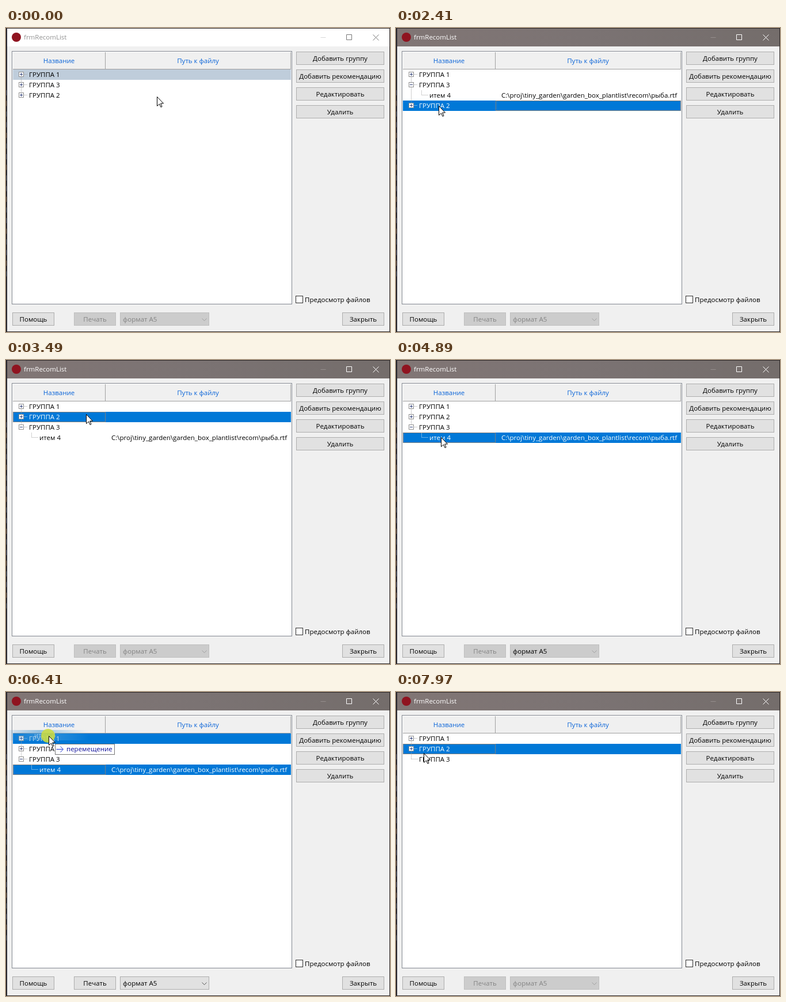
Write an HTML page with a canvas that moves like this. It is 667 px wide and 528 px high and loops after 8 s.

```html
<!DOCTYPE html>
<html lang="ru">
<head>
<meta charset="utf-8">
<title>frmRecomList</title>
<style>
  html, body { margin: 0; width: 100%; height: 100%; overflow: hidden; background: #f0f0f0; }
  canvas { display: block; width: 667px; height: 528px; }
</style>
</head>
<body>
<canvas id="stage" width="667" height="528"></canvas>
<script>
const ctx = document.getElementById('stage').getContext('2d');
const LOOP = 8000, TICK = 40, ROW_TOP = 72, ROW_H = 18;
const BLUE = '#0078d7', PATH = 'C:\\proj\\tiny_garden\\garden_box_plantlist\\recom\\рыба.rtf';

// Pointer positions: time, x, y
const POINTER = [
  [0, 262, 119], [410, 262, 119], [1050, 22, 98], [1330, 22, 98], [1970, 74, 137],
  [2370, 74, 137], [2410, 74, 135], [2530, 74, 135], [3050, 139, 95], [3410, 139, 95],
  [3490, 139, 94], [3890, 139, 94], [4410, 64, 133], [4690, 64, 133], [4890, 78, 134],
  [4970, 78, 134], [5330, 83, 136], [5690, 83, 136], [6130, 74, 76], [6970, 74, 76],
  [7130, 60, 102], [7210, 60, 102], [7770, 629, 495], [7810, 588, 494], [7970, 48, 106]
];

// Drag operations: image edge and label offsets are relative to the pointer
const DRAGS = [
  { from: 2530, to: 3410, label: 'ГРУППА 2', edge: -62, text: -34 },
  { from: 5690, to: 6690, label: 'итем 4', edge: -72, text: -25 }
];

const clamp = v => Math.max(0, Math.min(1, v));

function pointerAt(t) {
  const next = POINTER.findIndex(p => p[0] > t);
  if (next < 0) return POINTER[POINTER.length - 1].slice(1);
  if (next === 0) return POINTER[0].slice(1);
  const [t0, x0, y0] = POINTER[next - 1], [t1, x1, y1] = POINTER[next];
  const k = (t - t0) / (t1 - t0), e = k * k * (3 - 2 * k);
  return [Math.round(x0 + (x1 - x0) * e), Math.round(y0 + (y1 - y0) * e)];
}

function rect(x, y, w, h, fill, border) {
  ctx.fillStyle = border || fill;
  ctx.fillRect(x, y, w, h);
  if (border) {
    ctx.fillStyle = fill;
    ctx.fillRect(x + 1, y + 1, w - 2, h - 2);
  }
}

function text(label, x, baseline, color = '#000', align = 'left') {
  ctx.font = '11.5px "Open Sans", "Noto Sans", sans-serif';
  ctx.fillStyle = color;
  ctx.textAlign = align;
  ctx.fillText(label, x, baseline);
}

function lines(color, dash, ...paths) {
  ctx.strokeStyle = color;
  ctx.lineWidth = 1;
  ctx.setLineDash(dash);
  ctx.beginPath();
  for (const [first, ...rest] of paths) {
    ctx.moveTo(first[0] + .5, first[1] + .5);
    rest.forEach(p => ctx.lineTo(p[0] + .5, p[1] + .5));
  }
  ctx.stroke();
  ctx.setLineDash([]);
}

function button(label, x, y, w, enabled = true) {
  rect(x, y, w, 23, enabled ? '#e1e1e1' : '#cccccc', enabled ? '#adadad' : '#bfbfbf');
  text(label, x + w / 2, y + 16, enabled ? '#000' : '#838383', 'center');
}

function drawWindow(active) {
  rect(0, 0, 667, 528, '#f0f0f0', '#2b2626');
  rect(0, 0, 2, 528, '#25232a');
  for (let i = 0; i < 18; i++) {
    rect(0, 108 + i * 18.5, 1, 9, ['#555a70', '#765b45', '#4c5968'][i % 3]);
  }
  if (active) {
    const shade = ctx.createLinearGradient(0, 0, 667, 0);
    shade.addColorStop(0, '#817675');
    shade.addColorStop(.5, '#7b7373');
    shade.addColorStop(1, '#746d6b');
    rect(2, 1, 664, 31, shade);
  } else {
    rect(2, 1, 664, 31, '#fff');
  }
  ctx.fillStyle = '#8f1420';
  ctx.beginPath();
  ctx.arc(18, 16, 8, 0, 7);
  ctx.fill();
  text('frmRecomList', 31, 20, active ? '#fff' : '#929292');
  const ink = active ? '#fff' : '#777';
  lines(active ? '#958e8d' : '#d8d8d8', [], [[546, 16], [555, 16]]);
  lines(ink, [], [[591, 11], [600, 11], [600, 20], [591, 20], [591, 11]],
    [[637, 11], [647, 21]], [[647, 11], [637, 21]]);
}

function drawPrintControls(t) {
  const on = t >= 4890 && t < 7130;
  const level = clamp((t - 4890) / 320) * (1 - clamp((t - 7130) / 320));
  const panel = enabled => {
    button('Печать', 118, 494, 73, enabled);
    rect(198, 494, 155, 23, enabled ? '#e1e1e1' : '#cccccc', enabled ? '#adadad' : '#bfbfbf');
    lines(enabled ? '#555' : '#a0a0a0', [], [[340, 504], [344, 508], [348, 504]]);
  };
  panel(false);
  ctx.globalAlpha = level;
  panel(true);
  ctx.globalAlpha = 1;
  text('формат A5', 203, 510, on ? '#000' : '#838383');
}

function drawControls(t) {
  ['Добавить группу', 'Добавить рекомендацию', 'Редактировать', 'Удалить']
    .forEach((label, i) => button(label, 504, 41 + i * 31, 153));
  rect(503, 465, 13, 13, '#fff', '#333');
  text('Предосмотр файлов', 519, 476);
  button('Помощь', 11, 494, 73);
  button('Закрыть', 584, 494, 73);
  drawPrintControls(t);
}

function rowsAt(t) {
  const group = (n, sign) => ({ label: 'ГРУППА ' + n, sign });
  const item = { label: 'итем 4', path: PATH };
  if (t < 1250) return [group(1, '+'), group(3, '+'), group(2, '+')];
  if (t < 3410) return [group(1, '+'), group(3, '-'), item, group(2, '+')];
  if (t < 6690) return [group(1, '+'), group(2, '+'), group(3, '-'), item];
  return [group(1, '+'), group(2, '+'), group(3, '')];
}

function selectedAt(t) {
  if (t < 330) return 'ГРУППА 1';
  if (t < 4890) return 'ГРУППА 2';
  if (t < 6690) return 'итем 4';
  return t < 7130 ? '' : 'ГРУППА 2';
}

function drawFocus(x, y, w) {
  lines('#ff8728', [1, 1],
    [[x, y], [x + w - 1, y], [x + w - 1, y + ROW_H - 1], [x, y + ROW_H - 1], [x, y]]);
}

function drawTree(t, drag, pointerY) {
  rect(10, 40, 487, 440, '#fff', '#828790');
  rect(12, 42, 483, 29, '#f0f0f0');
  rect(12, 71, 483, 1, '#a0a0a0');
  rect(172, 42, 1, 29, '#a0a0a0');
  rect(494, 42, 1, 29, '#a0a0a0');
  text('Название', 92, 61, '#0a64d8', 'center');
  text('Путь к файлу', 333.5, 61, '#0a64d8', 'center');

  const hover = drag ? Math.floor((pointerY - ROW_TOP) / ROW_H) : -1;
  const selected = selectedAt(t);
  let lastGroupY = null;
  rowsAt(t).forEach((row, i) => {
    const y = ROW_TOP + i * ROW_H, mid = y + 8, isItem = !!row.path;
    const chosen = row.label === selected;
    const lit = t >= 330 && (chosen || (i === hover && !isItem));
    if (lit) rect(12, y, 483, ROW_H, BLUE);
    else if (chosen) rect(12, y, 483, ROW_H, '#bfcddb');
    const ink = lit ? '#fff' : '#000', dots = lit ? '#d5e8f8' : '#a0a0a0';
    if (isItem) {
      lines(dots, [1, 1], [[44, y], [44, mid], [56, mid]]);
      text(row.path, 183, y + 13, ink);
    } else {
      if (lastGroupY !== null) lines('#a0a0a0', [1, 1], [[26, lastGroupY + 5], [26, mid]]);
      lines(dots, [1, 1], [[row.sign ? 31 : 26, mid], [37, mid]]);
      if (row.sign) {
        rect(22, mid - 4, 9, 9, '#fff', '#919191');
        rect(24, mid, 5, 1, '#33437b');
        if (row.sign === '+') rect(26, mid - 2, 1, 5, '#33437b');
      }
      lastGroupY = mid;
    }
    text(row.label, isItem ? 58 : 40, y + 13, ink);
    if (chosen && t >= 330) {
      if (t < 2530) drawFocus(173, y, 322);
      else drawFocus(12, y, 161);
    }
  });
}

function drawDrag(drag, x, y) {
  const left = x + drag.edge, fade = ctx.createLinearGradient(left, 0, left + 142, 0);
  fade.addColorStop(0, 'rgba(70,150,215,.1)');
  fade.addColorStop(.4, 'rgba(85,160,215,.6)');
  fade.addColorStop(1, 'rgba(110,180,230,0)');
  rect(left, y - 10, 142, 18, fade);
  text(drag.label, x + drag.text, y + 3, 'rgba(255,255,255,.5)');
}

function drawHint(x, y) {
  rect(x + 11, y + 14, 104, 19, '#fff', '#767676');
  lines('#2038d0', [], [[x + 13, y + 23], [x + 24, y + 23]],
    [[x + 20, y + 18], [x + 25, y + 23], [x + 20, y + 28]]);
  text('перемещение', x + 31, y + 27, '#10109a');
}

function drawPointer(x, y) {
  const shape = [[0, 0], [0, 16], [4, 12.5], [6.5, 18], [8.5, 17], [6.2, 11.5], [11, 11.5]];
  ctx.beginPath();
  shape.forEach(([dx, dy]) => ctx.lineTo(x + .5 + dx, y + .5 + dy));
  ctx.closePath();
  ctx.fillStyle = '#fff';
  ctx.fill();
  ctx.strokeStyle = '#000';
  ctx.stroke();
}

function draw(t) {
  const [x, y] = pointerAt(t);
  const drag = DRAGS.find(d => t >= d.from && t < d.to);
  drawWindow(t >= 330);
  drawControls(t);
  drawTree(t, drag, y);
  if (drag) {
    drawDrag(drag, x, y);
    drawHint(x, y);
  }
  if (t >= 6330 && t < 6690) {
    ctx.fillStyle = t < 6410 ? 'rgba(205,220,60,.4)' : 'rgba(205,220,60,.85)';
    ctx.beginPath();
    ctx.arc(x - 1, y, 12, 0, 7);
    ctx.fill();
  }
  drawPointer(x, y);
}

const start = performance.now();
function frame() {
  const t = (performance.now() - start) % LOOP;
  draw(Math.max(0, Math.floor((t - 10) / TICK) * TICK + 10));
  requestAnimationFrame(frame);
}
frame();
</script>
</body>
</html>
```
